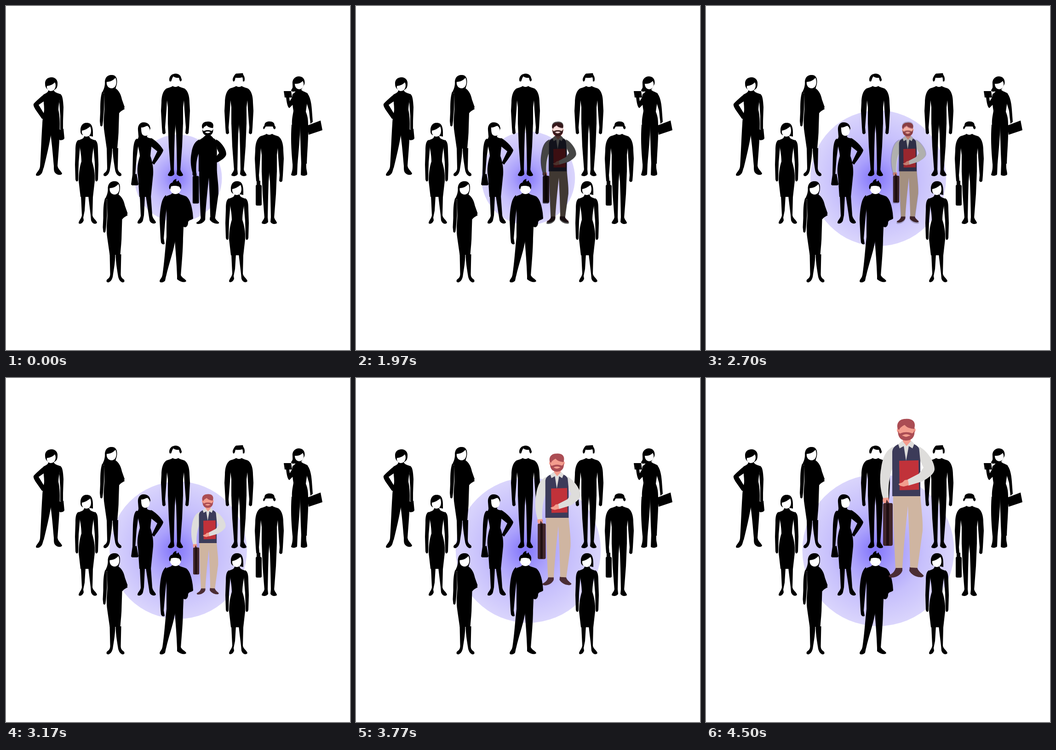
Recreate the animation shown at these times as an HTML page with a canvas. Size 748x748 px, loop 6010 ms.

```html
<!DOCTYPE html>
<html lang="en">
<head>
<meta charset="utf-8">
<title>Standing out</title>
<style>
html, body { margin: 0; width: 100%; height: 100%; overflow: hidden; background: #fff; }
canvas { display: block; width: 100vw; height: 100vh; }
</style>
</head>
<body>
<canvas id="stage" width="748" height="748"></canvas>
<script>
const SIZE = 748, LOOP = 6010, STEP = 1500;
const ctx = document.getElementById('stage').getContext('2d');

function layer() {
  const c = document.createElement('canvas');
  c.width = c.height = SIZE;
  return c.getContext('2d');
}

const clamp = v => Math.max(0, Math.min(1, v));
const mix = (a, b, p) => a + (b - a) * p;
const ease = t => t < 0.5 ? 4 * t ** 3 : 1 - 4 * (1 - t) ** 3;

function fill(g, d, color = '#000') {
  g.fillStyle = color;
  g.fill(new Path2D(d));
}

// Parts in "pair" are drawn again, mirrored about x = axis.
function person(g, { body = [], pair = [], axis = 0, hair, face, head }, dx = 0, dy = 0) {
  g.save();
  g.translate(dx, dy);
  body.forEach(d => fill(g, d));
  pair.forEach(d => fill(g, d));
  g.save();
  g.translate(2 * axis, 0);
  g.scale(-1, 1);
  pair.forEach(d => fill(g, d));
  g.restore();
  if (head) {
    g.fillStyle = '#fff';
    g.beginPath();
    g.ellipse(...head, 0, 0, 7);
    g.fill();
  }
  fill(g, hair);
  if (face) fill(g, face, '#fff');
  g.restore();
}

const hipWoman = {
  body: [
    'M92 183L104 183C105 188 112 189 119 192C117 205 114 215 114 226C116 235 117 245 117 258L79 258C79 245 82 235 83 226C83 215 81 205 81 193C87 189 92 188 92 183Z',
    'M84 191C75 198 65 207 60 213C59 217 62 221 64 225L78 245L84 247L85 238L71 215L84 206Z',
    'M117 191C123 193 124 203 125 220L124 250L124 268L118 268L118 240L116 210Z',
    'M116 269L125 267L127 288L124 291L118 292L114 289Z',
    'M79 256L101 256C98 285 90 320 82 352L74 350C76 320 77 285 79 256Z',
    'M97 256L117 256C117 290 114 320 112 348L104 348C102 325 100 300 97 280Z',
    'M74 349L82 351L79 361C76 369 68 371 65 368C65 362 73 358 74 349Z',
    'M104 347L112 347C113 355 119 358 122 364C121 369 111 368 107 363C104 360 104 355 104 347Z'
  ],
  hair: 'M85 170C84 160 91 155 99 155C108 155 113 162 112 170C112 177 109 181 104 183L91 182C87 179 85 175 85 170Z',
  face: 'M89 174C97 173 103 170 106 166C110 172 108 185 97 185C90 184 88 178 89 174Z'
};

const longHairWoman = {
  axis: 231.5,
  body: [
    'M216 180L238 179C246 184 250 193 252 203L258 220L246 233L245 264C245 280 243 295 242 310L219 310L214 275C211 255 213 240 214 225L213 190Z',
    'M209 187C205 198 205 215 205 230L204 250L205 260C207 263 210 262 210 258L211 250L213 225L213 190Z',
    'M240 207L252 211L258 224L238 236Z'
  ],
  pair: ['M219 309L231 309C231 325 228 342 226 355C225 363 221 369 216 370C212 370 211 367 213 364C217 361 220 358 220 352Z'],
  hair: 'M215 168C214 155 222 149 230 150C239 150 243 157 241 170L238 180L228 186L208 190C212 183 215 176 215 168Z',
  face: 'M219 165C227 165 234 161 238 156C242 166 240 178 230 179C222 179 218 172 219 165Z'
};

const man = {
  axis: 368.5,
  head: [368.5, 163, 11, 13],
  body: ['M363 173L374 173L376 175C382 178 387 178 390 181L387 205L385 220L385 257L352 257L352 220L350 205L347 181C350 178 355 178 361 175Z'],
  pair: [
    'M350 179C341 183 338 197 338 210L337 228L339 264L340 276C342 280 345 279 347 276L346 264L349 225L350 205Z',
    'M352 255L369 255L367 278L366 310L365 357L358 357L354 305Z',
    'M358 355L365 355L366 365C364 371 354 371 352 368C352 364 357 361 358 355Z'
  ],
  hair: 'M356 164C353 159 357 149 364 148C371 145 380 149 381 157C383 160 382 164 379 164C377 162 377 159 376 156C371 157 366 155 364 153C361 156 361 160 359 164Z'
};
const quiffMan = { ...man, hair: 'M356 164C353 159 357 153 360 149L362 147L377 146L378 150C381 153 382 160 380 164L377 164C377 160 377 158 376 155C370 157 364 156 361 156C360 159 360 162 358 164Z' };
const caseMan = {
  ...man,
  body: [...man.body, 'M341 276L349 276L349 285Q352 285 352 288L352 327Q352 330 349 330L342 330Q339 330 339 327L339 288Q339 285 341 285Z'],
  hair: 'M357 164C354 163 355 158 358 156C358 149 363 147 369 147C376 147 380 150 380 156C383 158 383 163 380 164C377 163 377 160 376 158L361 158Z'
};

const bookWoman = {
  body: [
    'M631 180L642 182C645 186 650 186 656 190C657 205 653 218 652 230C656 240 657 246 657 260L622 260C621 245 624 236 625 228C623 215 621 200 623 192C627 188 631 187 631 180Z',
    'M604 185L620 185L622 199L606 199Z',
    'M609 198L616 199L617 207L626 192L628 210L616 222C612 220 610 208 609 198Z',
    'M655 190C661 196 664 210 665 225L667 252L662 256L659 228L652 205Z',
    'M655 260L684 249L688 270L658 280Z',
    'M621 258L640 258C639 290 636 318 634 343L623 343C620 310 619 285 621 258Z',
    'M639 258L657 258C658 285 655 315 654 343L642 343C641 320 640 290 639 258Z',
    'M623 341L634 341L633 366C631 370 621 370 620 367C621 362 624 358 623 341Z',
    'M642 341L653 341C652 356 655 358 655 366C653 370 643 370 641 367Z'
  ],
  hair: 'M622 180C618 184 621 187 626 186C632 186 637 184 642 182L649 170C651 162 647 153 637 153C628 153 622 160 623 169C623 174 624 177 622 180Z',
  face: 'M628 169C635 170 642 167 645 163C649 168 648 180 638 181C631 181 628 175 628 169Z'
};

const bobWoman = {
  axis: 175.5,
  body: [
    'M170 283L181 283C182 289 187 289 193 292C190 310 187 325 187 338C191 350 194 365 193 380L189 415L162 415L158 380C158 365 160 350 164 338C164 325 161 310 158 292C164 289 169 289 170 283Z',
    'M163 413L173 413L171 445L168 460L169 466C166 474 160 475 158 472C158 467 164 462 165 455Z',
    'M179 413L189 413L188 455C189 462 197 466 198 471C196 475 188 475 185 466L184 455Z'
  ],
  pair: ['M158 291C152 294 151 302 151 315L150 345L151 377C152 383 157 383 157 377L158 340L161 305Z'],
  hair: 'M162 272C161 260 168 253 176 254C186 254 190 262 189 284L180 282L167 281C163 279 162 276 162 272Z',
  face: 'M165 271C172 270 178 266 183 262C186 268 187 283 175 284C168 284 164 278 165 271Z'
};

const bagWoman = {
  body: [
    'M294 283L306 283C307 287 313 287 319 289C317 300 315 312 314 326C318 338 321 352 320 366L315 415L290 415L287 370C284 355 287 340 291 326C290 312 285 300 284 290C288 287 293 288 294 283Z',
    'M284 288C278 293 277 305 276 320L275 367L281 367L284 330L288 300Z',
    'M275 367L284 365L288 388L286 390L274 390L272 388Z',
    'M315 287C325 291 338 305 342 313C342 318 333 330 322 345L317 341L329 316L314 304Z',
    'M291 413L302 413L300 455L298 465C297 472 289 475 286 472C285 467 292 463 293 456Z',
    'M304 413L315 413L318 455C319 463 326 467 326 471C323 475 314 473 312 466Z'
  ],
  hair: 'M287 270C286 259 292 252 300 253C308 253 313 258 314 266L311 276L306 284L300 290L288 290C286 288 289 285 288 282Z',
  face: 'M294 264C300 265 305 260 308 261C312 264 314 270 312 275C310 283 302 284 297 280C294 276 294 270 294 264Z'
};

const jacketMan = {
  head: [368.5, 396, 12, 13],
  body: [
    'M361 407L376 407C377 410 385 411 392 414C400 420 404 435 406 450L407 462C404 466 398 464 396 470C396 480 390 483 386 480L385 504L349 504L349 450L346 416C350 411 360 411 361 407Z',
    'M348 411C338 418 335 440 334 465L336 504L337 514C339 519 343 519 345 517L343 505L346 470L349 440Z',
    'M349 502L369 502C366 530 354 560 348 588L340 586C344 560 346 530 349 502Z',
    'M367 502L385 502C385 530 382 560 380 587L372 587C371 560 369 535 367 510Z',
    'M340 585L348 587L346 597C343 602 335 602 334 599C334 594 339 592 340 585Z',
    'M372 585L380 585C382 591 390 593 392 598C390 602 380 601 372 594Z'
  ],
  hair: 'M355 397C353 390 358 384 362 384C363 380 367 376 371 376C369 379 371 380 371 382L376 379C375 383 379 384 380 387C382 391 381 395 380 399L377 393C370 390 364 391 359 392L357 399Z'
};

const crowd = [
  [hipWoman], [longHairWoman], [man], [quiffMan, 138], [bookWoman],
  [bobWoman], [bagWoman], [caseMan, 204, 104],
  [longHairWoman, 6.5, 231], [jacketMan], [bobWoman, 327, 127]
];

// The chosen man at full size: colour, outline, and whether the shadow shows it white.
const SKIN = '#f39d8e', HAIR = '#ab4d54', SHIRT = '#dedddb', SHOE = '#4b2d34', CASE = '#41262b';
const hero = [
  [SHOE, 'M413 411L427 412L427 419C424 428 413 434 404 434C399 434 396 432 398 429C406 425 411 420 413 411Z'],
  [SHOE, 'M443 411L459 411C461 420 468 424 473 429C474 432 470 434 465 433C456 433 445 426 442 419Z'],
  ['#cfb5a1', 'M407 255L466 255C468 285 472 305 471 332L460 413L444 412L442 345L439 278C436 310 431 350 427 413L412 413C410 370 406 300 407 255Z'],
  [SHIRT, 'M408 149C394 155 385 168 381 195C377 215 378 240 385 262L397 261C396 235 398 215 406 195Z'],
  [CASE, 'M391 265Q391 261 394 261Q398 261 398 265L398 272L403 272Q406 272 406 276L406 361Q406 365 402 365L389 365Q385 365 385 361L385 276Q385 272 389 272L391 272Z'],
  ['#1f0f12', 'M392 273L398 273L398 364L392 364Z'],
  [SKIN, 'M385 261L397 260L398 268L397 272L393 264L391 272L387 272C384 269 384 266 385 261Z'],
  ['#3c3b59', 'M418 144L453 144C463 149 466 155 466 165L466 257L405 257L405 160C406 152 410 148 418 144Z'],
  [SHIRT, 'M418 144L427 136L446 136L453 143L449 153L441 148L435 180L430 148L421 153Z'],
  [SKIN, 'M428 128L445 128L445 138L436 148L428 138Z'],
  ['#c1323a', 'M420 180L462 179L463 243L421 244Z'],
  [SHIRT, 'M463 149C478 156 497 180 497 198C497 207 485 217 470 225L440 234L438 221L463 208L473 195L466 180Z'],
  [SKIN, 'M439 221L441 233L430 236C422 235 418 232 419 230L427 227L432 222Z'],
  [SKIN, 'M418 109C414 109 414 118 419 119C421 129 427 133 435 133C444 133 450 129 451 119C457 118 457 109 453 109L445 97L425 97Z', true],
  [HAIR, 'M417 111C413 98 421 89 433 89C447 87 455 94 454 104L453 111C447 110 437 109 432 102C428 104 421 108 420 113Z'],
  [HAIR, 'M418 114C419 120 421 122 424 120C431 117 440 117 447 120C450 121 452 118 453 113C455 125 450 136 435 136C421 136 416 124 418 114Z'],
  [SKIN, 'M426 126C430 121 441 121 445 126C441 125 439 128 435 128C431 128 429 125 426 126Z', true]
];

function drawHero(g, sx, sy, x, y, shadow) {
  g.save();
  g.translate(x, y);
  g.scale(sx, sy);
  for (const [color, d, pale] of hero) fill(g, d, !shadow ? color : pale ? '#fff' : '#000');
  g.restore();
}

const people = layer(), shade = layer();
crowd.forEach(([who, dx, dy]) => person(people, who, dx, dy));
drawHero(shade, 0.652, 0.645, 154.8, 194, true);

function drawDisc(r) {
  const c = 374.5;
  const grad = ctx.createRadialGradient(c - r * 0.05, c, 0, c, c, r);
  grad.addColorStop(0, '#8275fb');
  grad.addColorStop(0.3, '#aaa0fc');
  grad.addColorStop(0.62, '#c7c0fc');
  grad.addColorStop(1, '#dad5fc');
  ctx.fillStyle = grad;
  ctx.beginPath();
  ctx.arc(c, c, r, 0, 7);
  ctx.fill();
}

function draw(time) {
  const reveal = clamp((time - STEP) / STEP);
  const grow = ease(clamp((time - 2 * STEP) / STEP));

  ctx.fillStyle = '#fff';
  ctx.fillRect(0, 0, SIZE, SIZE);
  drawDisc(mix(mix(95, 149.3, ease(reveal)), 165, grow));
  ctx.drawImage(people.canvas, 0, 0);

  if (reveal > 0) {
    const s = mix(0.63, 1, grow);
    drawHero(ctx, s, s, mix(164.5, 0, grow), mix(197.6, 0, grow));
  }
  ctx.globalAlpha = 1 - reveal;
  ctx.drawImage(shade.canvas, 0, 0);
  ctx.globalAlpha = 1;
}

const start = performance.now();
function tick() {
  draw((performance.now() - start) % LOOP);
  requestAnimationFrame(tick);
}
tick();
</script>
</body>
</html>
```
